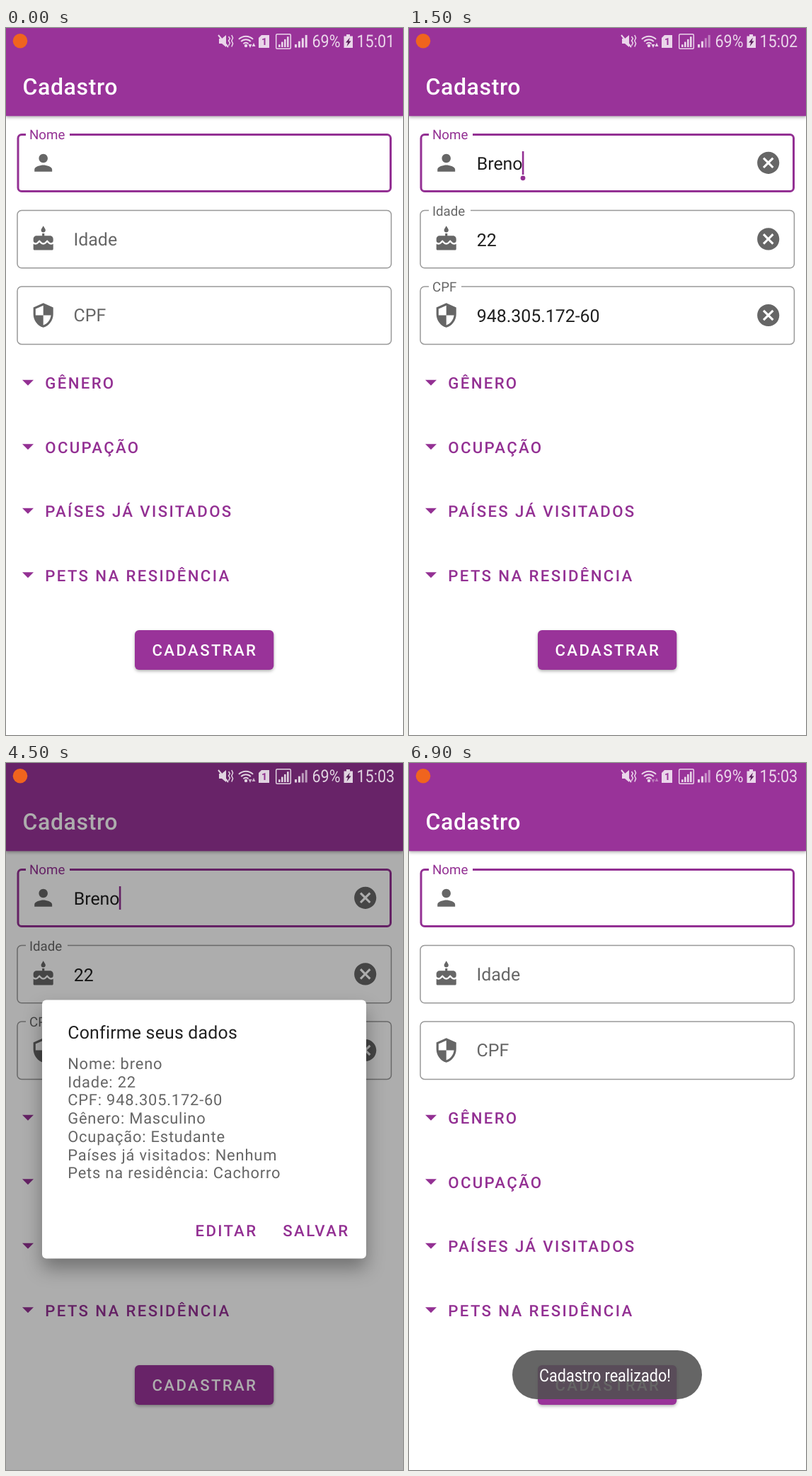
Animation, 561 px wide and 998 px high, one loop 7.5 s. Source, as an HTML page:

```html
<!DOCTYPE html>
<html lang="pt-BR">
<head>
<meta charset="utf-8">
<title>Cadastro</title>
<style>
  html, body { margin: 0; width: 100%; height: 100%; overflow: hidden; background: #fff; }
  svg { display: block; width: 100vw; height: 100vh; font-family: Roboto, sans-serif; text-rendering: geometricPrecision; }
  text { white-space: pre; }
  .bar { filter: drop-shadow(0 2px 2px rgba(0,0,0,.3)); }
  .sheet { filter: drop-shadow(0 14px 13px rgba(0,0,0,.34)); }
  .title { font-size: 32px; font-weight: 500; letter-spacing: .6px; fill: #fff; }
  .label { font-size: 18.7px; }
  .input { font-size: 24.9px; }
  .button { font-size: 22.2px; font-weight: 500; letter-spacing: 2.35px; }
  .head { font-size: 28px; letter-spacing: .2px; fill: #212121; }
  .subhead { font-size: 24.9px; letter-spacing: .2px; fill: #212121; }
  .item { font-size: 24.9px; letter-spacing: 1.1px; fill: #666; }
  .message { font-size: 21.9px; letter-spacing: .8px; fill: #666; }
  .narrow { font-size: 24.5px; fill: #fff; }
</style>
</head>
<body>
<svg id="stage" viewBox="0 0 561 998" preserveAspectRatio="none"></svg>
<script>
const PURPLE = '#933093', BAR = '#993399', GRAY = '#666', INK = '#1f1f1f';
const STEP = 1500, DP = 561 / 360;

const ICONS = {
  person: 'M12 12c2.21 0 4-1.79 4-4s-1.79-4-4-4-4 1.79-4 4 1.79 4 4 4zm0 2c-2.67 0-8 1.34-8 4v2h16v-2c0-2.66-5.33-4-8-4z',
  cake: 'M12 6c1.11 0 2-.9 2-2 0-.38-.1-.73-.29-1.03L12 0l-1.71 2.97c-.19.3-.29.65-.29 1.03 0 1.1.9 2 2 2zm4.6 9.99l-1.07-1.07-1.08 1.07c-1.3 1.3-3.58 1.31-4.89 0l-1.07-1.07-1.09 1.07C6.75 16.64 5.88 17 4.96 17c-.73 0-1.4-.23-1.96-.61V21c0 .55.45 1 1 1h16c.55 0 1-.45 1-1v-4.61c-.56.38-1.23.61-1.96.61-.92 0-1.79-.36-2.44-1.01zM18 9h-5V7h-2v2H6c-1.66 0-3 1.34-3 3v1.54c0 1.08.88 1.96 1.96 1.96.52 0 1.02-.2 1.38-.57l2.14-2.13 2.13 2.13c.74.74 2.03.74 2.77 0l2.14-2.13 2.13 2.13c.37.37.86.57 1.38.57 1.08 0 1.96-.88 1.96-1.96V12C21 10.34 19.66 9 18 9z',
  shield: 'M12 1L3 5v6c0 5.55 3.84 10.74 9 12 5.16-1.26 9-6.45 9-12V5l-9-4zm0 10.99h7c-.53 4.12-3.28 7.79-7 8.94V12H5V6.3l7-3.11v8.8z',
  clear: 'M12 2C6.47 2 2 6.47 2 12s4.47 10 10 10 10-4.47 10-10S17.53 2 12 2zm5 13.59L15.59 17 12 13.41 8.41 17 7 15.59 10.59 12 7 8.41 8.41 7 12 10.59 15.59 7 17 8.41 13.41 12 17 15.59z'
};

const FIELDS = [
  { label: 'Nome', icon: 'person', value: 'Breno', gap: 62 },
  { label: 'Idade', icon: 'cake', value: '22', gap: 59 },
  { label: 'CPF', icon: 'shield', value: '948.305.172-60', gap: 46 }
];
const MENUS = ['GÊNERO', 'OCUPAÇÃO', 'PAÍSES JÁ VISITADOS', 'PETS NA RESIDÊNCIA'];
const COUNTRIES = ['EUA', 'Rússia', 'Argentina', 'Canadá', 'Irlanda', 'Outro(s)', 'Nenhum'];
const SUMMARY = [
  'Nome: breno', 'Idade: 22', 'CPF: 948.305.172-60', 'Gênero: Masculino',
  'Ocupação: Estudante', 'Países já visitados: Nenhum', 'Pets na residência: Cachorro'
];

const SCENES = [
  { clock: '15:01', arrows: 1, signal: 1 },
  { clock: '15:02', arrows: 1, signal: .5, filled: true, handle: true },
  { clock: '15:02', arrows: .45, signal: .7, filled: true, dialog: countryDialog },
  { clock: '15:03', arrows: .8, signal: .7, filled: true, dialog: confirmDialog },
  { clock: '15:03', arrows: .45, signal: .6, toast: true }
];

const text = (cls, x, y, str, fill) =>
  `<text class="${cls}" x="${x}" y="${y}"${fill ? ` fill="${fill}"` : ''}>${str}</text>`;
const rect = (x, y, w, h, attrs) =>
  `<rect x="${x}" y="${y}" width="${w}" height="${h}" ${attrs}/>`;
const path = (d, attrs = '') => `<path d="${d}" ${attrs}/>`;
const icon = (name, cx, cy) =>
  path(ICONS[name], `fill="${GRAY}" transform="translate(${cx - 12 * DP} ${cy - 12 * DP}) scale(${DP})"`);
// Condensed face: one fixed ratio for all such text.
const narrow = (x, y, str) =>
  `<text class="narrow" transform="translate(${x} ${y}) scale(.88 1)">${str}</text>`;

function field({ label, icon: name, value, gap }, i, filled) {
  const top = 149 + i * 107.6, mid = top + 41.3, focus = i === 0;
  const color = focus ? PURPLE : GRAY;
  let out = focus
    ? rect(17, top + 1.5, 526.5, 80, `rx="5" fill="none" stroke="${PURPLE}" stroke-width="3"`)
    : rect(16, top + .8, 528.4, 81.4, 'rx="6" fill="none" stroke="#999" stroke-width="1.5"');
  if (focus || filled) {
    out += rect(28, top - 2, gap, 7, 'fill="#fff"') + text('label', 33, top + 8, label, color);
  } else {
    out += text('input', 95.5, mid + 8.7, label, GRAY);
  }
  out += icon(name, 52.7, mid);
  if (filled) out += text('input', 95.7, mid + 9.7, value, INK) + icon('clear', 507.7, mid);
  return out;
}

function menu(label, i) {
  const y = 496.7 + i * 90.5;
  return path(`M23 ${y}h16l-8 8z`, `fill="${PURPLE}"`) + text('button', 55.3, y + 12.5, label, PURPLE);
}

function form({ filled, handle }) {
  let out = `<g class="bar">${rect(0, -5, 561, 129.3, `fill="${BAR}"`)}</g>`
    + text('title', 23.5, 93.5, 'Cadastro')
    + FIELDS.map((f, i) => field(f, i, filled)).join('')
    + MENUS.map(menu).join('')
    + `<g class="bar">${rect(182, 850, 196.3, 56, `rx="6" fill="${BAR}"`)}</g>`
    + text('button', 206.5, 886.3, 'CADASTRAR', '#fff');
  if (filled) out += rect(159.8, 174, 2.6, 33, `fill="${PURPLE}"`);
  if (handle) out += `<circle cx="161" cy="211.8" r="3.4" fill="${PURPLE}"/>`;
  return out;
}

const sheet = (y, h) => `<g class="sheet">${rect(51, y, 458, h, 'rx="6" fill="#fff"')}</g>`;

function countryDialog() {
  const rows = COUNTRIES.map((name, i) => {
    const y = 310.8 + i * 74.85, last = i === COUNTRIES.length - 1;
    const box = last
      ? rect(93, y - 14.2, 28.4, 28.4, 'rx="3" fill="#bb86fc"')
        + path(`M97.5 ${y + .5}l6.8 6.8 13-13`, 'fill="none" stroke="#fff" stroke-width="3"')
      : rect(94.5, y - 12.8, 25.4, 25.4, 'rx="2" fill="none" stroke="#757575" stroke-width="3"');
    return box + text('item', 162, y + 9.2, name);
  });
  return sheet(162, 711)
    + text('head', 87, 220.5, 'Selecione os países que você')
    + text('head', 87, 253, 'já visitou')
    + rows.join('')
    + rect(51, 790.3, 458, 1.6, 'fill="#dcdcdc"')
    + text('button', 237, 841, 'SAIR', PURPLE)
    + text('button', 340, 841, 'CONFIRMAR', PURPLE);
}

function confirmDialog() {
  return sheet(334.5, 365)
    + text('subhead', 87.3, 388.8, 'Confirme seus dados')
    + SUMMARY.map((line, i) => text('message', 87.2, 432 + i * 25.7, line)).join('')
    + text('button', 267.5, 668, 'EDITAR', PURPLE)
    + text('button', 391.3, 668, 'SALVAR', PURPLE);
}

function bars(x, base, w, step, h, fade) {
  return [1, 2, 3, 4].map(n =>
    rect(x + (n - 1) * step, base - n * h, w, n * h, `opacity="${n > 2 ? fade : 1}"`)).join('');
}

function status({ clock, arrows, signal }) {
  const line = 'fill="none" stroke="#fff"';
  const arcs = [5, 9.5, 14].map(r => {
    const d = r * .72;
    return `M${339 - d} ${26 - d}A${r} ${r} 0 0 1 ${339 + d} ${26 - d}`;
  }).join('');
  return '<circle cx="20" cy="18.3" r="10.3" fill="#f0641e"/>'
    + '<g fill="#fff" opacity=".8">'
    + path('M301 15h4l6-5v17l-6-5h-4z')
    + path('M300 10l14 17', `${line} stroke-width="2"`)
    + path('M314.5 12l2 3-2 3 2 3-2 4M318.8 10l1.8 4-1.8 4 1.8 4-1.8 4.5', `${line} stroke-width="1.5"`)
    + path(arcs, `${line} stroke-width="2"`)
    + '<circle cx="339" cy="25" r="2.2"/>'
    + `<g opacity="${arrows}">${path('M342.5 23h5l-2.5 5zM347.5 26h5l-2.5-5z')}</g>`
    + path('M361 10h11v18h-15v-14z')
    + text('', 361, 24, '<tspan font-size="14" font-weight="700">1</tspan>', BAR)
    + rect(381.7, 8.7, 20.6, 20.6, `rx="1.5" ${line} stroke-width="1.5"`)
    + bars(385, 27, 2.6, 4, 3.7, 1)
    + bars(408, 27.5, 3, 4.9, 4.4, signal)
    + path('M481 9h5v2.5h4v16.5h-12.5v-16.5h3.5z')
    + path('M486 13.5l-6 7h3.2l-1.6 5.5 6-7.5h-3.2z', 'fill="#4b194b"')
    + narrow(432.5, 27.3, '69%') + narrow(495.5, 27.3, clock)
    + '</g>';
}

const toast = () =>
  rect(146, 829, 268, 69, 'rx="34.5" fill="rgba(80,80,80,.88)"') + narrow(184, 873, 'Cadastro realizado!');

function draw(scene) {
  const { dialog } = scene;
  return rect(0, 0, 561, 998, 'fill="#fff"') + form(scene)
    + (dialog ? rect(0, 0, 561, 998, 'fill="#000" opacity=".32"') + dialog() : '')
    + status(scene)
    + (scene.toast ? toast() : '');
}

const stage = document.getElementById('stage');
const start = performance.now();
let shown = -1;

function tick() {
  const at = Math.floor((performance.now() - start) / STEP) % SCENES.length;
  if (at !== shown) {
    shown = at;
    stage.innerHTML = draw(SCENES[at]);
  }
  requestAnimationFrame(tick);
}
tick();
</script>
</body>
</html>
```
